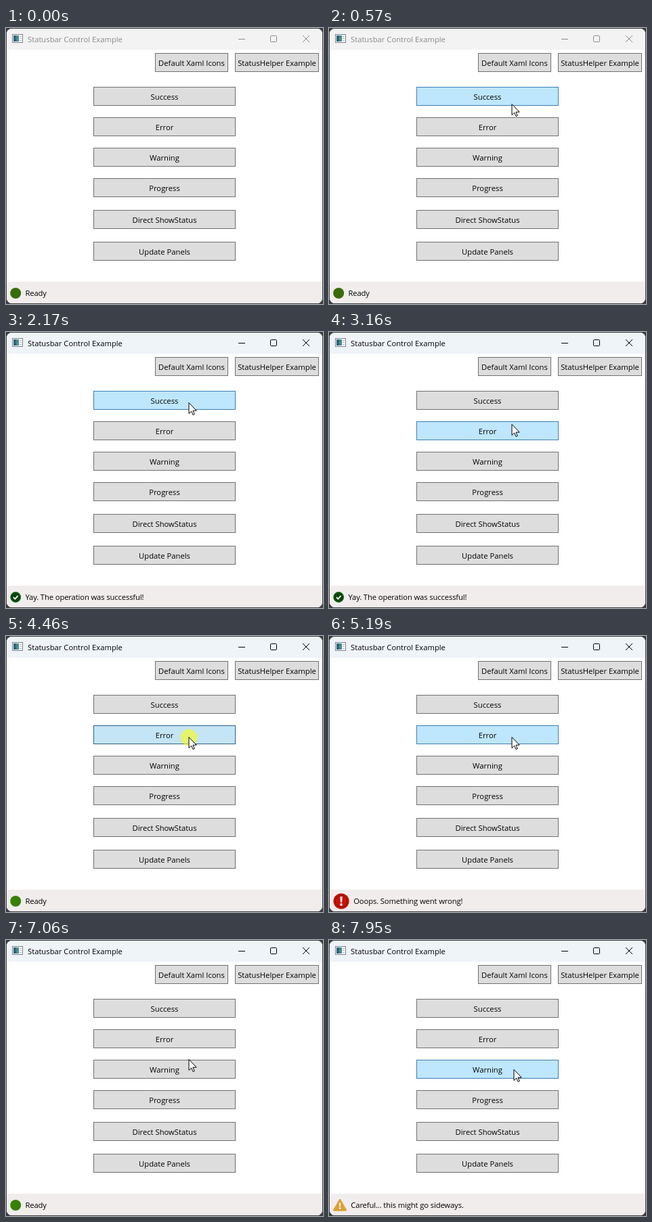
Animation, 468 px wide and 408 px high, one loop 8 s. Source, as an HTML page:

```html
<!DOCTYPE html>
<html lang="en">
<head>
<meta charset="utf-8">
<title>Statusbar Control Example</title>
<style>
html, body { margin: 0; width: 100%; height: 100%; overflow: hidden; background: #3a3e42; }
svg { display: block; font: 11.25px "Open Sans", "Noto Sans", sans-serif; }
.btn rect { fill: #ddd; stroke: #707070; }
.btn.hover rect { fill: #bee6fd; stroke: #3c7fb1; }
.btn.down rect { fill: #c4e5f6; stroke: #2c628b; }
.btn text { text-anchor: middle; }
#bar { fill: #f3f3f3; }
#title { fill: #8a8a8a; }
#caption { fill: none; stroke: #8a8a8a; }
.active #bar { fill: #eff4f9; }
.active #title { fill: #000; }
.active #caption { stroke: #000; }
#label { letter-spacing: -.13px; }
</style>
</head>
<body>
<svg id="stage" width="468" height="408" viewBox="0 0 468 408">
  <clipPath id="frame"><rect x="1" y="1" width="466" height="406" rx="7.5"/></clipPath>
  <g clip-path="url(#frame)">
    <rect width="468" height="408" fill="#fff"/>
    <rect id="bar" width="468" height="32"/>
    <rect y="375" width="468" height="33" fill="#f1eded"/>
  </g>
  <g id="appIcon">
    <rect x="9.5" y="9.5" width="15" height="12" fill="#fafafa" stroke="#7d8287"/>
    <rect x="11" y="11" width="8" height="9" fill="#4b8a94"/>
    <rect x="11" y="11" width="4" height="9" fill="#2f6577"/>
    <path d="M20 12.5h3M20 15.5h3M20 18.5h3" stroke="#b4b8bc"/>
  </g>
  <text id="title" x="32" y="21">Statusbar Control Example</text>
  <path id="caption" d="M343 16.5h10M391.500 11.500h7a1 1 0 0 1 1 1v7a1 1 0 0 1-1 1h-7a1 1 0 0 1-1-1v-7a1 1 0 0 1 1-1zM438 11l10 10M448 11l-10 10"/>
  <g id="buttons"></g>
  <!-- icons are drawn in a 16 x 16 box -->
  <g id="icon">
    <circle id="ready" cx="8" cy="8" r="8"/>
    <g id="success">
      <circle cx="8" cy="8" r="7.4" fill="#0a430c" stroke="#12701a" stroke-width="1.1"/>
      <path d="M4.700 8.200l2.400 2.400 4.300-4.700" fill="none" stroke="#fff" stroke-width="1.8"/>
    </g>
    <g id="error">
      <circle cx="8" cy="8" r="7.8" fill="#c9130a"/>
      <circle cx="8" cy="8" r="5.900" fill="none" stroke="#8d150d" stroke-width=".9"/>
      <path d="M6.900 3.500h2.200l-.4 5.600H7.300z" fill="#fff"/>
      <circle cx="8" cy="11.300" r="1.250" fill="#fff"/>
    </g>
    <g id="warning">
      <path d="M8 1.700L15 14H1z" fill="#dca035" stroke="#dca035" stroke-width="2" stroke-linejoin="round"/>
      <path d="M7.100 5.200h1.800l-.3 4.600H7.400z" fill="#fff"/>
      <circle cx="8" cy="11.800" r="1.100" fill="#fff"/>
    </g>
  </g>
  <text id="label" y="396"></text>
  <circle id="glow" r="12.500" fill="#ff0" fill-opacity=".56"/>
  <path id="cursor" d="M.5.500V16.600L4.200 13.100 6.600 18.600 8.800 17.600 6.500 12.200H11.700Z" fill="#fff" stroke="#000"/>
</svg>
<script>
const LOOP = 8000, TICK = 73, PULSE = 600;
const $ = id => document.getElementById(id);

// x, y, width, caption
const buttons = [
  [220, 37, 108, "Default Xaml Icons"],
  [338, 37, 124, "StatusHelper Example"],
  [129, 87, 210, "Success"],
  [129, 132, 210, "Error"],
  [129, 177, 210, "Warning"],
  [129, 222, 210, "Progress"],
  [129, 269, 210, "Direct ShowStatus"],
  [129, 316, 210, "Update Panels"]
].map(([x, y, w, caption]) => {
  const el = document.createElementNS("http://www.w3.org/2000/svg", "g");
  el.innerHTML = `<rect x="${x + .5}" y="${y + .5}" width="${w - 1}" height="27"/>
    <text x="${x + w / 2}" y="${y + 19}">${caption}</text>`;
  $("buttons").append(el);
  return { el, hit: p => p[1] >= x && p[1] < x + w && p[2] >= y && p[2] < y + 28 };
});

// time, x, y
const moves = [
  [130, 396, 338], [203, 386, 302], [276, 371, 261], [349, 343, 206],
  [422, 305, 157], [495, 281, 126], [568, 270, 112], [640, 270, 104],
  [2950, 270, 109], [3040, 270, 121], [3130, 270, 136], [3220, 270, 145], [3310, 270, 149],
  [7000, 270, 161], [7060, 270, 176],
  [7280, 271, 181], [7354, 272, 188], [7428, 273, 191]
];
// press, release
const clicks = [[860, 970], [4460, 4590], [7502, 7650]];
// time, kind, message
const states = [
  [0, "ready", "Ready"],
  [970, "success", "Yay. The operation was successful!"],
  [3960, "ready", "Ready"],
  [4590, "error", "Ooops. Something went wrong!"],
  [6570, "ready", "Ready"],
  [7650, "warning", "Careful... this might go sideways."]
];
const kinds = ["ready", "success", "error", "warning"];
const latest = (rows, t) => rows.filter(r => r[0] <= t).pop();

function iconSize(kind, age) {
  if (kind === "ready" || age >= 2 * PULSE - 20) return 16;
  const p = Math.floor(age / TICK) * TICK / PULSE;
  return 16 + 8 * Math.max(0, 1 - Math.abs(1 - p));
}

function draw(t) {
  const pos = latest(moves, t);
  const down = clicks.some(([a, b]) => t >= a && t < b);
  const active = t >= clicks[0][0];
  $("stage").setAttribute("class", active ? "active" : "");

  for (const { el, hit } of buttons) {
    const over = pos && hit(pos);
    el.setAttribute("class", "btn" + (over ? down ? " down" : " hover" : ""));
  }

  $("cursor").style.display = pos ? "" : "none";
  $("glow").style.display = down ? "" : "none";
  if (pos) {
    $("cursor").setAttribute("transform", `translate(${pos[1] - .5} ${pos[2]})`);
    $("glow").setAttribute("cx", pos[1]);
    $("glow").setAttribute("cy", pos[2] + 1);
  }

  const [start, kind, message] = latest(states, t);
  const size = iconSize(kind, t - start);
  for (const k of kinds) $(k).style.display = k === kind ? "" : "none";
  $("ready").setAttribute("fill", active ? "#368006" : "#396c0a");
  $("icon").setAttribute("transform", `translate(6.2 ${392 - size / 2}) scale(${size / 16})`);
  $("label").setAttribute("x", 12.4 + size);
  if ($("label").textContent !== message) $("label").textContent = message;
}

const begin = performance.now();
function loop() {
  draw((performance.now() - begin) % LOOP);
  requestAnimationFrame(loop);
}
loop();
</script>
</body>
</html>
```
